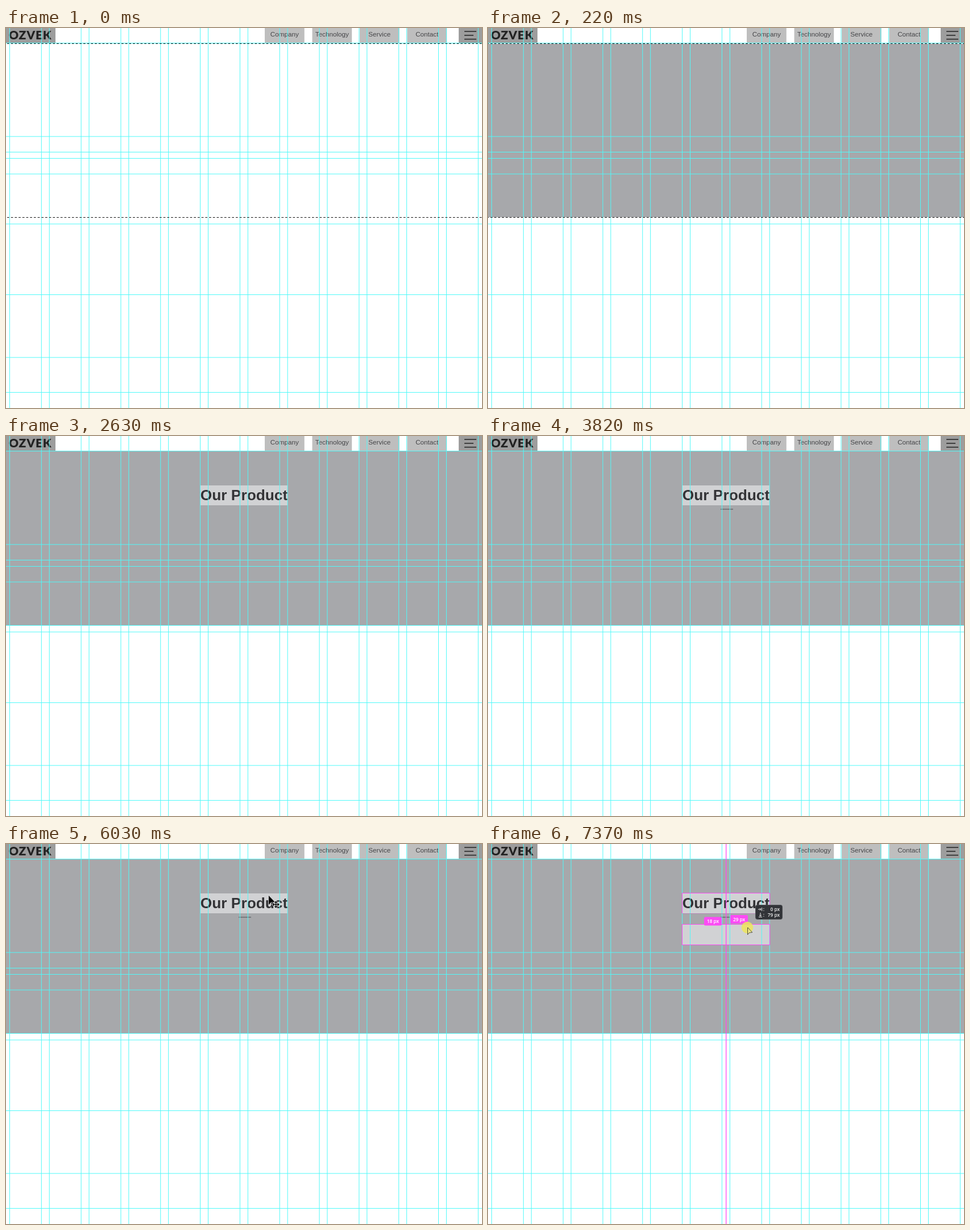
An HTML page with a canvas that plays this animation: 837x669 px, repeating every 8000 ms.

```html
<!DOCTYPE html>
<html lang="en">
<head>
<meta charset="utf-8">
<title>Layout with guides</title>
<style>
html, body { margin: 0; width: 100%; height: 100%; overflow: hidden; background: #fff; }
canvas { display: block; }
</style>
</head>
<body>
<canvas id="stage" width="837" height="669"></canvas>
<script>
const W = 837, H = 669, LOOP = 8000, TICK = 111.6;
const ctx = document.getElementById('stage').getContext('2d');
const PINK = '#fc4bf5', CYAN = '#50f9f9', PANEL = '#d1d2d4';
const SANS = '"Liberation Sans", Arial, sans-serif';
const SMALL = '600 8.3px "Open Sans", "Noto Sans", sans-serif';
const SCALE = 0.695; // stage pixels per document pixel
const ROWS = [26, 190.5, 218, 229, 256.5, 333, 344.5, 469, 579.5, 641];

const easeOut = (u, power) => 1 - (1 - Math.min(u, 1)) ** power;
const bend = (a, b, c, p) => a * (1 - p) ** 2 + 2 * b * p * (1 - p) + c * p * p;

function rect(x, y, w, h, color) {
  ctx.fillStyle = color;
  ctx.fillRect(x, y, w, h);
}

function text(str, x, y, font, color, align = 'center') {
  ctx.font = font;
  ctx.fillStyle = color;
  ctx.textAlign = align;
  ctx.fillText(str, x, y);
}

function path(points, color, width = 1) {
  ctx.beginPath();
  points.forEach(([x, y]) => ctx.lineTo(x, y));
  ctx.strokeStyle = color;
  ctx.lineWidth = width;
  ctx.stroke();
}

function rounded(x, y, w, h, r, color) {
  ctx.beginPath();
  ctx.roundRect(x, y, w, h, r);
  ctx.fillStyle = color;
  ctx.fill();
}

function header() {
  rect(0, 0, 87, 26, '#9d9d9d');
  ctx.letterSpacing = '0.8px';
  text('OZVEK', 5, 20, '900 21px Lato, sans-serif', '#222', 'left');
  ctx.letterSpacing = '0px';
  ['Company', 'Technology', 'Service', 'Contact'].forEach((label, i) => {
    const x = 455 + 83.5 * i;
    rect(x, 0, 69.7, 26, '#bebebe');
    text(label, x + 34.8, 15, '11.7px ' + SANS, '#454548');
  });
  rect(796, 0, 41, 26, '#9d9d9d');
  for (let i = 0; i < 3; i++) rect(806, 5.3 + 6.8 * i, i === 1 ? 16 : 21, 1.5, '#222');
}

function guides() {
  for (let i = 0; i < 12; i++) {
    const x = 5.9 + 69.82 * i;
    rect(x, 0, 1, H, CYAN);
    rect(x + 55.9, 0, 1, H, CYAN);
  }
  for (const y of ROWS) rect(0, y, W, 1, CYAN);
}

function ants(tick) {
  const step = Math.floor(tick * .7 + .62);
  for (const y of [27, 333]) {
    rect(0, y, W, 1, '#fff');
    ctx.setLineDash([3.7, 3]);
    ctx.lineDashOffset = step * 2.2 + 4.7;
    path([[0, y + .5], [W, y + .5]], '#111', 1);
    ctx.setLineDash([]);
  }
}

function arrow(x, y, size, fill, edge) {
  ctx.beginPath();
  for (const [dx, dy] of [[0, 0], [0, 16], [4, 11.5], [10.5, 11]]) {
    ctx.lineTo(x + dx * size, y + dy * size);
  }
  ctx.closePath();
  ctx.fillStyle = fill;
  ctx.strokeStyle = edge;
  ctx.lineWidth = 1;
  ctx.stroke();
  ctx.fill();
}

function moveGlyph(x, y) {
  for (const [color, width] of [['#ddd', 3], ['#000', 1.3]]) {
    for (let i = 0; i < 4; i++) {
      ctx.save();
      ctx.translate(x, y);
      ctx.rotate(i * Math.PI / 2);
      path([[0, 0], [0, -5]], color, width);
      path([[-2, -3.2], [0, -5.2], [2, -3.2]], color, width);
      ctx.restore();
    }
  }
}

function clickSpot(x, y) {
  ctx.beginPath();
  ctx.arc(x, y, 10.3, 0, 7);
  ctx.fillStyle = 'rgba(238, 230, 92, .85)';
  ctx.fill();
}

function gapLabel(value, x, y, side) {
  const w = value > 9 ? 31 : 26, left = side < 0 ? x - w : x;
  rounded(left, y - 7.5, w, 15, 2, PINK);
  text(value + ' px', left + w / 2, y + 3, SMALL, '#fff');
}

function tooltip(x, y, distance) {
  rounded(x, y, 48, 26, 4, '#55575b');
  rounded(x + .8, y + .8, 46.4, 24.4, 3.4, '#323438');
  const white = '#eee';
  path([[x + 5, y + 8], [x + 10, y + 8]], white);
  path([[x + 8, y + 6], [x + 10, y + 8], [x + 8, y + 10]], white);
  path([[x + 11.5, y + 5], [x + 11.5, y + 11]], white);
  path([[x + 9, y + 14], [x + 9, y + 20]], white);
  path([[x + 7, y + 18], [x + 9, y + 20], [x + 11, y + 18]], white);
  path([[x + 6, y + 21.5], [x + 12, y + 21.5]], white);
  [0, distance].forEach((value, i) => {
    const base = y + 11 + i * 10;
    text(':', x + 15, base, SMALL, white);
    text(value + ' px', x + 43, base, SMALL, white, 'right');
  });
}

function dragState(tick) {
  const e = easeOut((tick - 60) / 6, 2), distance = Math.round(15 + 64 * e);
  return { x: Math.round(461 - 5 * e), y: Math.round(113 + 34 * e),
    distance, top: Math.round(87 + distance * SCALE) };
}

function dragOverlay({ x, y, distance, top }) {
  const past = distance - 51, apart = past > 9;
  ctx.lineWidth = 1;
  ctx.strokeStyle = apart ? PINK : '#9a949d';
  ctx.strokeRect(341.5, top - .5, 154, 36);
  path([[341.5, 122], [341.5, 86.5], [495.5, 86.5], [495.5, 122]], PINK);
  if (past >= 0) {
    path([[342, 122.5], [495, 122.5]], apart ? '#b489b5' : PINK, apart ? 1 : 2);
  }
  rect(418, 0, 1.3, H, PINK);
  if (past >= 0) {
    gapLabel(Math.round(1 + past * .607), 411, ((apart ? 129 : 122) + top) / 2 + .5, -1);
    gapLabel(Math.round(6 + past * .82), 426, (122 + top) / 2 + .5, 1);
  }
  tooltip(x + 14, y - 40, distance);
  clickSpot(x, y);
  arrow(x + .5, y, .78, 'rgba(235, 230, 150, .5)', '#222');
}

function mousePointer(t, tick) {
  const p = easeOut((tick - 44) / 10, 3);
  const x = bend(466, 334, 462, p), y = bend(171, 92, 91, p);
  if (t >= 6370) clickSpot(x - .5, y);
  if (t >= 6170) arrow(x + 4, y + 4, .9, '#fff', '#222');
  arrow(x, y, 1, '#000', '#c4c4c6');
  if (t < 6170) moveGlyph(x + 12.5, y + 15.5);
}

function draw(t) {
  const tick = Math.floor((t + 4) / TICK);
  const drag = tick >= 60 && dragState(tick);
  rect(0, 0, W, H, '#fff');
  if (t >= 220) rect(0, 27, W, 307, '#a7a8ab');
  header();
  if (t >= 1870) rect(342, 87, 153, 35, PANEL);
  if (t >= 3820) rect(409, 128.3, 22, 1.2, '#5b5c60');
  if (drag) rect(342, drag.top, 153, 35, PANEL);
  if (t >= 2630) text('Our Product', 418.5, 112.5, 'bold 26.3px ' + SANS, '#333336');
  guides();
  if (t < 1220) ants(tick);
  if (drag) dragOverlay(drag);
  else if (tick >= 44) mousePointer(t, tick);
}

function frame(now) {
  draw(now % LOOP);
  requestAnimationFrame(frame);
}
draw(0);
requestAnimationFrame(frame);
</script>
</body>
</html>
```
